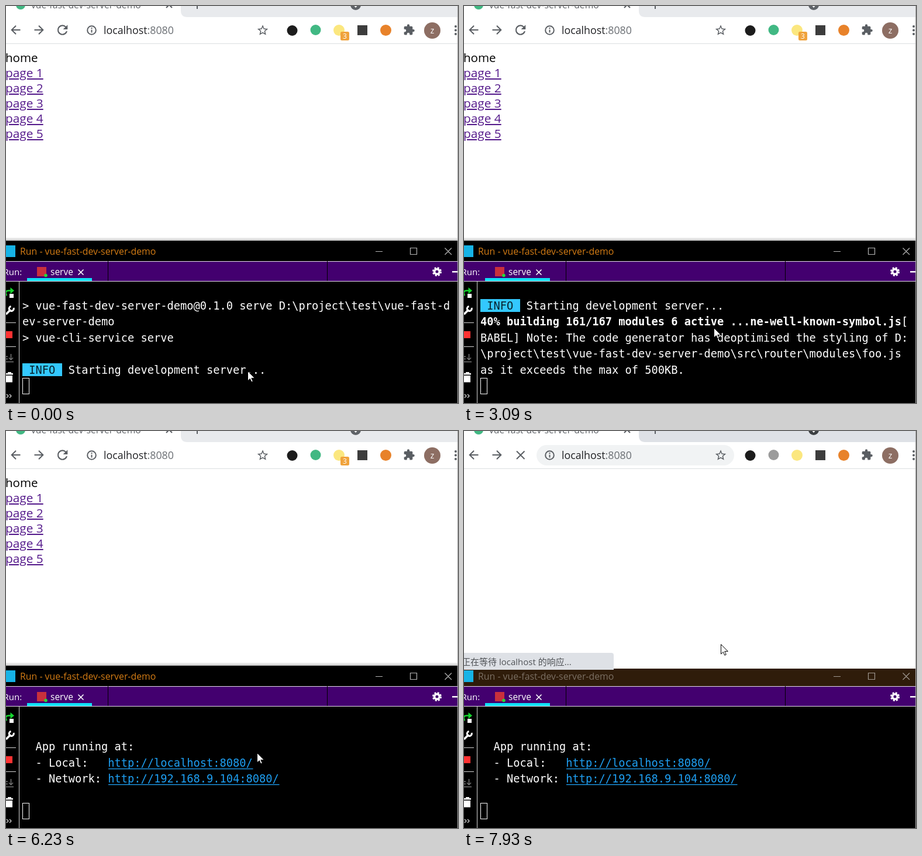
An HTML page for the animation above (8 s loop, 773 px wide and 680 px high).

```html
<!DOCTYPE html>
<html lang="en">
<head>
<meta charset="utf-8">
<title>Dev server start</title>
<style>
html, body { margin: 0; width: 100%; height: 100%; overflow: hidden; background: #fff; }
svg { display: block; }
text { font-family: "Open Sans", "Noto Sans CJK SC", "Noto Sans CJK", sans-serif; white-space: pre; }
.link { font-size: 20.8px; fill: #551a8b; text-decoration: underline; text-decoration-thickness: 1.4px; }
.ic { fill: none; stroke: #5a5e63; stroke-width: 2; }
.g { fill: #5a5e63; }
#term text { font: 18.69px "DejaVu Sans Mono", "Noto Sans CJK SC", monospace; fill: #fff; }
#term .b { font-weight: bold; }
#term .k { fill: #08222c; }
#term .c { fill: #34b8ea; }
#term .d { fill: #4a4a4a; }
#term .u { fill: #1e9ff2; }
</style>
</head>
<body>
<svg width="773" height="680" viewBox="0 0 773 680">
  <rect width="773" height="680" fill="#fff"/>

  <!-- browser tabs -->
  <path id="strip" d="M299 0V8Q299 19 310 19H773V0Z"/>
  <circle cx="25" cy="-2" r="8" fill="#41b883"/>
  <text x="43" y="4" font-size="15.7" fill="#5f6368">vue-fast-dev-server-demo</text>
  <path class="ic" d="M274 3L279-2L284 3M327 -8V5"/>
  <circle id="media" cx="598" cy="-2" r="9"/>
  <path d="M594 -2H602L598 3Z" fill="#fff"/>

  <!-- toolbar -->
  <rect id="pill" x="124" y="24" width="338" height="35" rx="17.5" fill="#f1f3f4"/>
  <path class="ic" d="M24.5 41H10M17 33.7L9.7 41L17 48.3M48.5 41H63M56 33.7L63.3 41L56 48.3"/>
  <path id="reload" class="g" transform="translate(83.5 28)scale(1.09)" d="M17.65 6.35A8 8 0 1 0 19.73 14h-2.08A6 6 0 1 1 12 6c1.66 0 3.14.69 4.22 1.78L13 11h7V4z"/>
  <path id="stop" class="ic" d="M90 34.5L103.5 48M103.5 34.5L90 48"/>
  <circle class="ic" cx="146.5" cy="41.5" r="7.3"/>
  <path class="ic" d="M146.5 40.5V45.5M146.5 37V39"/>
  <text x="167" y="48" font-size="17.8" fill="#202124">localhost<tspan fill="#6a6e73">:8080</tspan></text>
  <path class="g" transform="translate(428 30.5)scale(.92)" d="M22 9.24l-7.19-.62L12 2 9.19 8.63 2 9.24l5.46 4.73L5.82 21 12 17.27 18.18 21l-1.63-7.03zM12 15.4l-3.76 2.27 1-4.28-3.32-2.88 4.38-.38L12 6.1l1.71 4.04 4.38.38-3.32 2.88 1 4.28z"/>
  <circle cx="489.5" cy="42" r="9" fill="#1c1c1c"/>
  <circle id="ext" cx="529.5" cy="41" r="9"/>
  <circle cx="569.5" cy="41.5" r="9.5" fill="#fbe77f"/>
  <g id="badge">
    <rect x="572" y="44" width="15" height="15" rx="2.5" fill="#f0a33c"/>
    <text x="579.5" y="56" font-size="12" fill="#fff" text-anchor="middle">3</text>
  </g>
  <rect x="601" y="33" width="17" height="17" fill="#3c3c3c"/>
  <circle cx="649.5" cy="41.5" r="9.5" fill="#e8822a"/>
  <path class="g" transform="translate(679 30.5)scale(.86)" d="M20.5 11H19V7c0-1.1-.9-2-2-2h-4V3.5a2.5 2.5 0 0 0-5 0V5H4c-1.1 0-2 .9-2 2v3.8h1.5a2.7 2.7 0 0 1 0 5.4H2V20c0 1.1.9 2 2 2h3.8v-1.5a2.7 2.7 0 0 1 5.4 0V22H17c1.1 0 2-.9 2-2v-4h1.5a2.5 2.5 0 0 0 0-5z"/>
  <circle cx="729" cy="42" r="14" fill="#8d6e63"/>
  <text x="729" y="46.5" font-size="14" fill="#fff" text-anchor="middle">z</text>
  <path d="M769 35V49" stroke="#5a5e63" stroke-width="4" stroke-linecap="round" stroke-dasharray="0 6.5"/>
  <rect y="64" width="773" height="1" fill="#dcdee0"/>

  <!-- page -->
  <g id="page"><text x="-1" y="96" font-size="20.5">home</text></g>

  <!-- run window -->
  <defs><linearGradient id="shade" x2="0" y2="1"><stop stop-color="#fff"/><stop offset="1" stop-color="#c4c4c4"/></linearGradient></defs>
  <rect id="shadow" y="396" width="772" height="6" fill="url(#shade)"/>
  <rect id="bar" width="772"/>
  <rect y="410" width="16" height="20" fill="#16b3e6"/>
  <text id="name" x="24" y="426" font-size="15.87">Run - vue-fast-dev-server-demo</text>
  <path id="win" fill="none" stroke-width="1.2" d="M632 420.5H644M691.5 414.5H702.5V425.5H691.5ZM750.5 414.5L762 426M762 414.5L750.5 426"/>
  <rect y="437" width="772" height="35" fill="#e6dcec"/>
  <rect y="438" width="772" height="33" fill="#43006f"/>
  <path d="M174.5 437V471M549.5 437V471" stroke="#000"/>
  <rect x="36" y="466" width="111" height="5" fill="#10e2fa"/>
  <text x="-4.5" y="461" font-size="15" fill="#fff">Run:</text>
  <rect x="53" y="447" width="16" height="16" fill="#c9303c"/>
  <circle cx="68" cy="461.5" r="2.8" fill="#1fdc3c"/>
  <text x="76" y="461" font-size="15.5" fill="#fff">serve</text>
  <path d="M123.5 451.5L132.5 460.5M132.5 451.5L123.5 460.5" stroke="#fff" stroke-width="1.6"/>
  <rect x="763" y="454" width="9" height="2.5" fill="#fff"/>
  <circle cx="737" cy="455" r="4.3" fill="none" stroke="#fff" stroke-width="3.6"/>
  <circle cx="737" cy="455" r="6.5" fill="none" stroke="#fff" stroke-width="3" stroke-dasharray="2.9 2.205"/>
  <rect y="472" width="772" height="208"/>

  <!-- side tools -->
  <path d="M22.5 472V680M0 542.5H17M0 583.5H17" stroke="#d8d8d8"/>
  <path d="M1 496Q-3 488 4 487.5H10" fill="none" stroke="#16d62e" stroke-width="2.6"/>
  <path d="M7.5 482L14 487.5L7.5 493Z" fill="#16d62e"/>
  <rect x="6" y="493" width="7" height="7" fill="#fff"/>
  <path d="M0 528L8 520" stroke="#fff" stroke-width="3.6"/>
  <path d="M13 517A4 4 0 1 1 8.5 514.5" fill="none" stroke="#fff" stroke-width="3"/>
  <rect y="557" width="11" height="12" fill="#ff3232"/>
  <path d="M8.5 596V606M5 602.5L8.5 606L12 602.5M0 609.5H13M0 600.5H3M0 604.5H3" fill="none" stroke="#777" stroke-width="1.5"/>
  <path d="M0 629H12V631.5H0ZM3 627H9V629H3ZM0 633H11V644.5H0Z" fill="#fff"/>
  <path d="M1 665L4 668L1 671M6 665L9 668L6 671" fill="none" stroke="#ddd" stroke-width="1.2"/>

  <g id="term"></g>

  <g id="status">
    <path d="M0 380H252Q256 380 256 384V409H0Z" fill="#dee1e6"/>
    <text x="-4" y="401" font-size="15" fill="#505357">正在等待 localhost 的响应...</text>
  </g>
  <rect x="772" width="1" height="680" fill="#a4a4a4"/>
  <path id="mouse" d="M0 0V16.5L3.8 12.9L6.3 18.6L8.8 17.5L6.3 11.9H11.8Z" fill="#fff" stroke="#000"/>
</svg>
<script>
const LOOP = 8000, LEFT = 28, CELL = 11.25;
const $ = id => document.getElementById(id);
const raw = String.raw;

// Terminal helpers: k is the row, c the column.
const px = c => LEFT + c * CELL;
const base = k => Math.round(492.4 + k * 27.45);
const put = (k, c, s, cls = "") =>
  `<text x="${px(c)}" y="${base(k)}" class="${cls}">${s.replace(/>/g, "&gt;")}</text>`;
const tag = (k, word, rest, cls) =>
  `<rect x="${LEFT}" y="${base(k) - 18}" width="68" height="22" fill="#33c8ff"/>` +
  put(k, 1, word, "k") + put(k, 7, rest, cls);
const caret = (k, c) =>
  `<rect x="${Math.round(px(c)) + .5}" y="${base(k) - 19.5}" width="11" height="27" fill="none" stroke="#fff"/>`;
const bar = (k, s) => put(k, 0, s, "b") + caret(k, s.length);
const url = (k, s) => put(k, 13, s, "u") +
  `<rect x="175" y="${base(k) + 3}" width="${s.length * CELL}" height="1.3" fill="#1e9ff2"/>`;

const build = (done, all, path, pct = 40) => {
  const head = `${pct}% building ${done}/${all} modules ${all - done} active ...`;
  return head + path.slice(head.length - 64);
};
const core = file => raw`D:\project\test\vue-fast-dev-server-demo\node_modules\core-js\internals` + "\\" + file;
const foo = raw`D:\project\test\vue-fast-dev-server-demo\src\router\modules\foo.js`;
const symbol = build(161, 167, core("define-well-known-symbol.js"));
const rebuilt = build(0, 1, foo);

const start = k => tag(k, "INFO", "Starting development server...");
const intro = put(1, 0, raw`> vue-fast-dev-server-demo@0.1.0 serve D:\project\test\vue-fast-d`) +
  put(2, 0, "ev-server-demo") + put(3, 0, "> vue-cli-service serve") + start(5);
const note = head => put(2, 0, head, "b") + put(2, 64, "[") +
  put(3, 0, "BABEL] Note: The code generator has deoptimised the styling of D:") +
  put(4, 0, raw`\project\test\vue-fast-dev-server-demo\src\router\modules\foo.js`) +
  put(5, 0, "as it exceeds the max of 500KB.");
const first = start(1) + note(symbol), second = note(rebuilt);
const wait = tag(0, "WAIT", "Compiling...", "c") +
  put(0, 54.2, "下", "d") + put(0, 56.1, "午", "d") + put(0, 58, "4:34:25", "d");
const running = put(2, 2, "App running at:") + put(3, 2, "- Local:") + url(3, "http://localhost:8080/") +
  put(4, 2, "- Network:") + url(4, "http://192.168.9.104:8080/") + caret(6, 0);

const screens = [
  [0, intro + caret(6, 0)],
  [700, intro + bar(6, build(0, 1, raw`vue-fast-dev-server-demo\src\main.js`, 10))],
  [820, intro + bar(6, build(11, 18, core("object-define-property.js")))],
  [970, intro + bar(6, build(37, 52, core("advance-string-index.js")))],
  [1090, intro + bar(6, build(68, 81, core("function-bind-context.js")))],
  [1240, intro + bar(6, build(94, 107, core("array-method-uses-to-length.js")))],
  [1390, intro + bar(6, build(121, 134, core("create-iterator-constructor.js")))],
  [1510, intro + bar(6, build(148, 159, core("inherit-if-required.js")))],
  [1630, intro + bar(6, build(161, 166, core("object-get-own-property-names.js")))],
  [1780, intro + bar(6, symbol)],
  [3090, first + caret(6, 0)],
  [3210, first + bar(6, build(162, 167, foo))],
  [3360, first + bar(6, build(166, 167, core("wrapped-well-known-symbol.js")))],
  [3510, first + bar(6, "71% basic module optimization")],
  [3630, first + bar(6, "80% chunk modules optimization")],
  [3750, first + bar(6, "90% chunk assets processing")],
  [4060, caret(6, 0)],
  [4180, running],
  [4330, wait + caret(2, 0)],
  [4610, wait + bar(2, build(0, 1, foo, 10))],
  [4730, wait + bar(2, rebuilt)],
  [5570, wait + second + caret(6, 0)],
  [5840, wait + second + bar(6, "71% sealing")],
  [5960, wait + second + bar(6, "90% chunk assets processing")],
  [6110, caret(6, 0)],
  [6230, running]
];

// Pointer tip: time, x, y
const moves = [
  [0, 413, 625], [150, 415, 612], [270, 417, 604], [430, 418, 596], [700, 421, 582],
  [820, 422, 575], [970, 424, 568], [1090, 425, 563], [1240, 426, 555], [1390, 427, 551],
  [4060, 429, 551], [6760, 433, 552], [6880, 437, 552], [7030, 380, 324], [7180, 372, 290],
  [7300, 376, 296], [7420, 390, 312], [7570, 408, 332], [7690, 424, 348], [7810, 435, 360], [7930, 439, 365]
];

for (let n = 1; n <= 5; n++)
  $("page").insertAdjacentHTML("beforeend", `<text class="link" x="-1" y="${96 + 26 * n}">page ${n}</text>`);

const at = (list, t) => list.findLast(e => e[0] <= t);
const show = (id, on) => $(id).setAttribute("visibility", on ? "visible" : "hidden");
const set = (id, key, value) => $(id).setAttribute(key, value);
let screen;

function draw(t) {
  const next = at(screens, t);
  if (next !== screen) $("term").innerHTML = (screen = next)[1];

  const [, x, y] = at(moves, t);
  set("mouse", "transform", `translate(${x + .5} ${y + .5})`);

  const front = t >= 7180, loading = t >= 7570, blank = t >= 7690;
  set("strip", "fill", front ? "#dee1e6" : "#e8eaed");
  set("media", "fill", front ? "#3c4043" : "#5f6368");
  set("bar", "y", front ? 407 : 402);
  set("bar", "height", front ? 30 : 35);
  set("bar", "fill", front ? "#2f1c0a" : "#000");
  set("name", "fill", front ? "#7b6f63" : "#d47c14");
  set("win", "stroke", front ? "#a09890" : "#b4b4b4");
  set("ext", "fill", blank ? "#9b9b9b" : "#41b883");
  show("shadow", !front);
  show("pill", loading);
  show("stop", loading);
  show("reload", !loading);
  show("page", !blank);
  show("badge", !blank);
  show("status", t >= 7810);
}

const begin = performance.now();
function tick() {
  draw((performance.now() - begin) % LOOP);
  requestAnimationFrame(tick);
}
tick();
</script>
</body>
</html>
```
